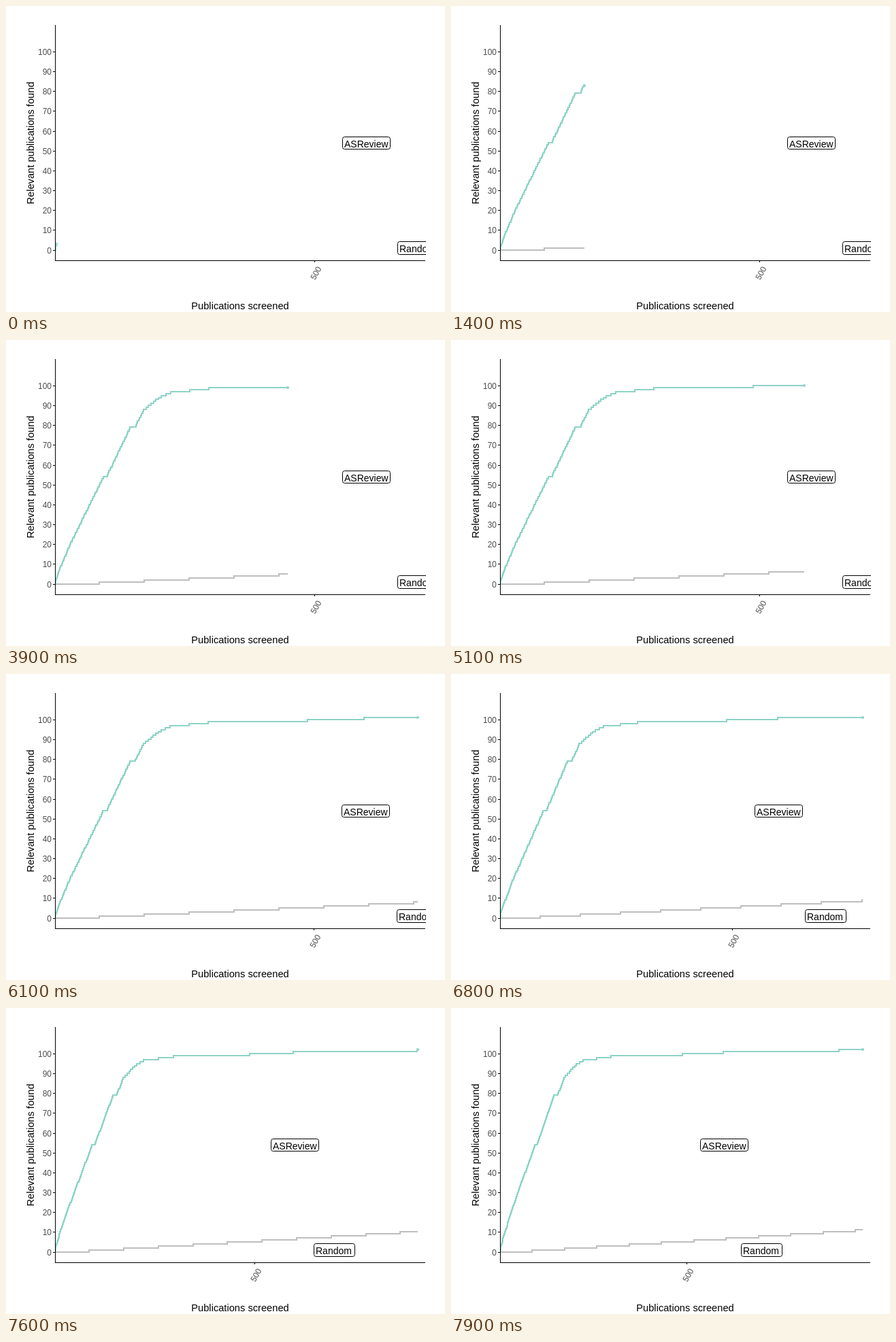
Write an HTML page that moves like this. It is 645 px wide and 450 px high and loops after 8000 ms.

```html
<!DOCTYPE html>
<html lang="en">
<head>
<meta charset="utf-8">
<title>Publications screened</title>
<style>
  html, body { margin: 0; width: 645px; height: 450px; overflow: hidden; background: #fff; }
  svg { display: block; font-family: "Liberation Sans", Arial, sans-serif; }
  .crisp { fill: none; shape-rendering: crispEdges; }
  .axis { stroke: #000; }
  .curve { stroke-width: 2; }
  .tick { font-size: 12px; fill: #4d4d4d; }
  .title { font-size: 14.67px; text-anchor: middle; }
  .tag { font-size: 14px; }
  .tag rect { fill: #fff; stroke: #000; }
</style>
</head>
<body>
<svg width="645" height="450" viewBox="0 0 645 450">
  <clipPath id="panel"><rect x="72" y="28" width="545" height="347"/></clipPath>
  <g clip-path="url(#panel)">
    <path id="random" class="crisp curve" stroke="#bebebe"/>
    <path id="review" class="crisp curve" stroke="#8dd3c7"/>
    <circle id="head" r="2" fill="#8dd3c7"/>
    <g id="reviewTag" class="tag">
      <rect x="-35.5" y="192.5" width="70" height="18" rx="3"/>
      <text x="-33" y="208">ASReview</text>
    </g>
    <g id="randomTag" class="tag">
      <rect x="-30.5" y="346.5" width="60" height="19" rx="3"/>
      <text x="-28" y="362">Random</text>
    </g>
  </g>
  <path id="axes" class="crisp axis"/>
  <g id="yLabels" class="tick" text-anchor="end"></g>
  <g id="xTick">
    <path class="crisp axis" d="M0.5 375V377"/>
    <text class="tick" text-anchor="middle" transform="translate(2.2 392.7) rotate(-60)" y="4.3">500</text>
  </g>
  <text class="title" x="344" y="446">Publications screened</text>
  <text class="title" transform="translate(41 201.5) rotate(-90)">Relevant publications found</text>
</svg>
<script>
const $ = id => document.getElementById(id);
const LEFT = 72.5, RIGHT = 605.49, START_SCALE = 0.7615;
const LOOP = 8000, STEP = 100;

// Shape of the discovery curve as [screened, found]; finds are evenly spaced in between
const shape = [
  [0, 0], [0, 2], [7, 7], [28, 20], [92, 54], [100, 55], [144, 79], [155, 80],
  [170, 88], [204, 95], [222, 97], [296, 99], [488, 100], [597, 101], [907, 102]
];

const reviewHits = shape.slice(1).flatMap(([n, found], i) => {
  const [n0, found0] = shape[i];
  const gap = (n - n0) / (found - found0);
  return Array.from({ length: found - found0 }, (_, j) => n0 + gap * (j + 1));
});
const randomHits = Array.from({ length: 12 }, (_, i) => 85.2 + 86.7 * i);

const yOf = found => Math.floor(359.02 - 2.915 * found);

// Steady pace that quickens near the end
const screenedAt = k => 1.6 + 11.47 * k + 9.23 * Math.max(0, k - 72);

function staircase(hits, screened, xOf) {
  const seen = hits.filter(n => n <= screened);
  const steps = seen.map((n, i) => `H${Math.round(xOf(n))}V${yOf(i + 1)}`).join("");
  return {
    found: seen.length,
    d: `M${Math.round(LEFT)} ${yOf(0)}${steps}H${Math.round(xOf(screened))}`
  };
}

function drawAxes() {
  let d = "M72.5 28V375M72 374.5H616";
  for (let v = 0; v <= 100; v += 10) {
    const y = yOf(v);
    d += `M69 ${y + 0.5}H72`;
    const label = document.createElementNS("http://www.w3.org/2000/svg", "text");
    label.setAttribute("x", 67);
    label.setAttribute("y", y + 5);
    label.textContent = v;
    $("yLabels").append(label);
  }
  $("axes").setAttribute("d", d);
}

const moveTo = (id, x) => $(id).setAttribute("transform", `translate(${x} 0)`);

function render(time) {
  const screened = screenedAt(Math.floor(time % LOOP / STEP));
  const scale = Math.min(START_SCALE, (RIGHT - LEFT) / screened);
  const xOf = n => LEFT + n * scale;

  const review = staircase(reviewHits, screened, xOf);
  $("review").setAttribute("d", review.d);
  $("random").setAttribute("d", staircase(randomHits, screened, xOf).d);
  $("head").setAttribute("cx", Math.round(xOf(screened)));
  $("head").setAttribute("cy", yOf(review.found));

  moveTo("xTick", Math.floor(xOf(500)));
  moveTo("reviewTag", Math.round(xOf(600) + 0.7));
  moveTo("randomTag", Math.round(xOf(700) + 0.7));
}

drawAxes();
const start = performance.now();
function loop() {
  render(performance.now() - start);
  requestAnimationFrame(loop);
}
loop();
</script>
</body>
</html>
```
